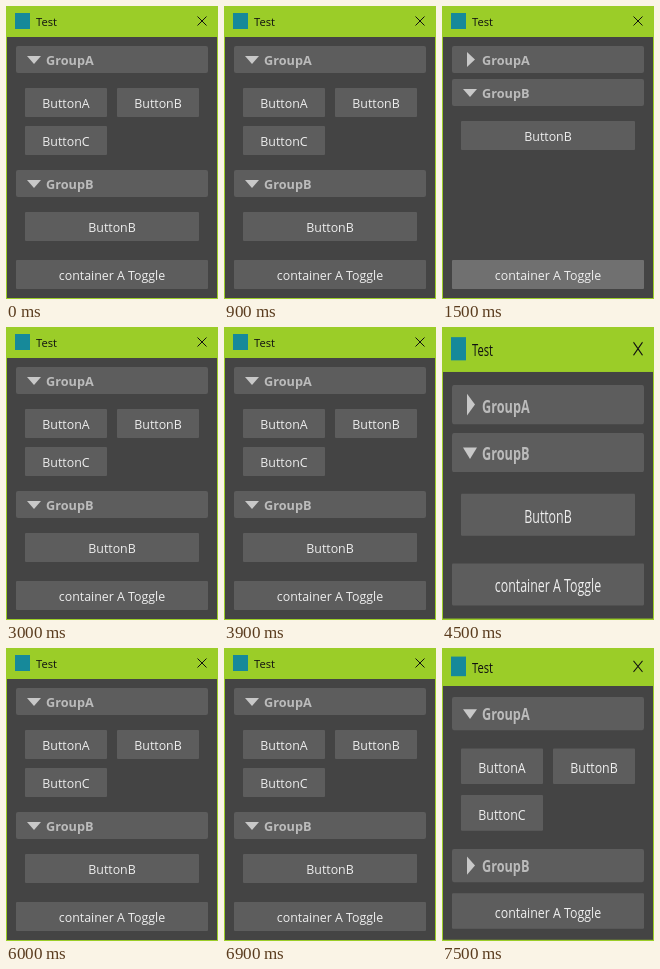
Animation of 212 by 293 pixels, one loop 8 s. Source, as an HTML page:

```html
<!DOCTYPE html>
<html lang="en">
<head>
<meta charset="utf-8">
<title>Collapsible groups</title>
<style>
html, body { margin: 0; width: 100%; height: 100%; overflow: hidden; background: #444; }
svg { display: block; width: 100vw; height: 100vh; }
text { font: 12.4px "Open Sans", "Noto Sans", sans-serif; fill: #eee; }
.head { font-weight: 700; font-size: 12.7px; fill: #bbb; }
.title { font-size: 11.2px; fill: #111; }
</style>
</head>
<body>
<svg id="stage" viewBox="0 0 212 293" preserveAspectRatio="none"></svg>
<script>
const stage = document.getElementById('stage');
const LOOP = 8000, STEP = 1500;
const both = { a: true, b: true, height: 293 };
const states = [
  both,
  { a: false, b: true, height: 293, hover: true },
  both,
  { a: false, b: true, height: 202 },
  both,
  { a: true, b: false, height: 239 },
];

const rect = (x, y, w, h, fill, r = 0) =>
  `<rect x="${x}" y="${y}" width="${w}" height="${h}" rx="${r}" fill="${fill}"/>`;

const button = (label, x, y, w, fill = '#5d5d5d') =>
  rect(x, y, w, 29, fill, 1) +
  `<text x="${x + w / 2}" y="${y + 20}" text-anchor="middle">${label}</text>`;

function header(label, y, open) {
  const arrow = open ? `M21 ${y + 10}h14l-7 8z` : `M25 ${y + 6}v15l8-7.5z`;
  return rect(10, y, 192, 27, '#5d5d5d', 2) +
    `<path d="${arrow}" fill="#c8c8c8"/>` +
    `<text class="head" x="40" y="${y + 19}">${label}</text>`;
}

function frame(h) {
  return rect(0, 0, 212, h, '#9bcd28') +
    rect(1, 31, 210, h - 32, '#444') +
    rect(9, 7, 15, 16, '#16899a') +
    '<text class="title" x="30" y="20">Test</text>' +
    '<path d="M191.5 10.5l9 9m0-9l-9 9" stroke="#111" fill="none"/>';
}

function draw({ a, b, height, hover }) {
  const yB = a ? 164 : 73;
  let out = frame(height) + header('GroupA', 40, a);
  if (a) {
    out += button('ButtonA', 19, 82, 82) +
      button('ButtonB', 111, 82, 82) +
      button('ButtonC', 19, 120, 82);
  }
  out += header('GroupB', yB, b);
  if (b) out += button('ButtonB', 19, yB + 42, 174);
  out += button('container A Toggle', 10, height - 39, 192, hover ? '#707070' : undefined);
  // Shorter windows are stretched to fill the stage.
  stage.innerHTML = `<g transform="scale(1 ${293 / height})">${out}</g>`;
}

let shown;
const start = performance.now();
function tick() {
  const state = states[Math.floor((performance.now() - start) % LOOP / STEP)];
  if (state !== shown) draw(shown = state);
  requestAnimationFrame(tick);
}
tick();
</script>
</body>
</html>
```
